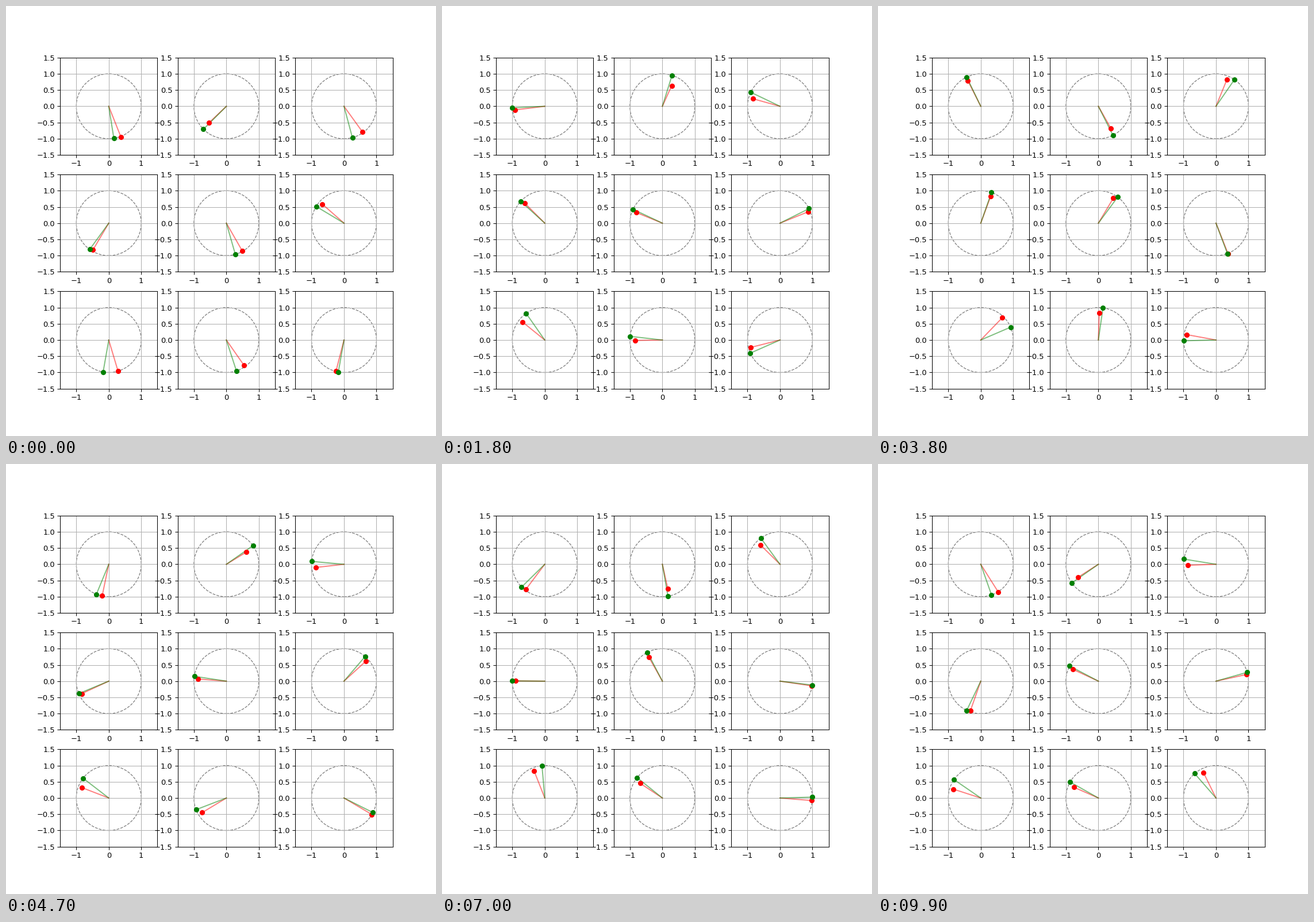
Recreate the animation shown at these times as a matplotlib script. Size 748x748 px, loop 10 s.

```python
import numpy as np
import matplotlib.pyplot as plt
from matplotlib.animation import FuncAnimation

FRAMES = 100
COLORS = ("red", "green")

# Per panel: start angle (deg), speed (deg/step), acceleration, red lead (deg), red reach
PANELS = [
    (279, 14.65, 0.000, 7, 0.95),
    (225, 11.70, -0.009, -3, 0.73),
    (285, 12.60, 0.008, 15, 0.91),
    (234, 14.65, 0.000, 3, 0.93),
    (286, 12.60, 0.006, 8, 0.92),
    (149, 13.20, 0.000, -5, 0.94),
    (260, 12.30, 0.011, 22, 0.95),
    (288, 13.75, -0.006, 11, 0.88),
    (260, 16.88, 0.000, -9, 0.94),
]


def polar(radius, degrees):
    a = np.radians(degrees)
    return radius * np.cos(a), radius * np.sin(a)


def tips(step, start, speed, accel, lead, reach):
    """Ends of the red and green pointers; red is pulled toward the lower right."""
    angle = start + speed * step + accel * step ** 2
    pull = np.cos(np.radians(angle + 60))
    red = polar(reach * (1 + 0.07 * pull), angle + lead + 6 * pull)
    return red, polar(1, angle)


fig, axes = plt.subplots(3, 3, figsize=(8, 8), dpi=93.5)
circles = []
for ax in axes.flat:
    ax.set(xlim=(-1.5, 1.5), ylim=(-1.5, 1.5), aspect="equal")
    ax.grid(True)
    circles.append(ax.add_patch(
        plt.Circle((0, 0), 1, fill=False, color="gray", ls="--")))

# Render the fixed grid once and keep it behind the pointers
fig.canvas.draw()
fig.figimage(np.array(fig.canvas.buffer_rgba()), origin="upper", zorder=-1)
for ax, circle in zip(axes.flat, circles):
    circle.remove()
    ax.set_axis_off()

pointers = []
for ax in axes.flat:
    lines = [ax.plot([], [], color=c, alpha=0.5)[0] for c in COLORS]
    dots = [ax.plot([], [], "o", color=c)[0] for c in COLORS]
    pointers.append((lines, dots))


def update(step):
    artists = []
    for (lines, dots), panel in zip(pointers, PANELS):
        for line, dot, (x, y) in zip(lines, dots, tips(step, *panel)):
            line.set_data([0, x], [0, y])
            dot.set_data([x], [y])
            artists += [line, dot]
    return artists


anim = FuncAnimation(fig, update, frames=FRAMES, interval=100,
                     repeat=True, repeat_delay=0)
plt.show()
```
